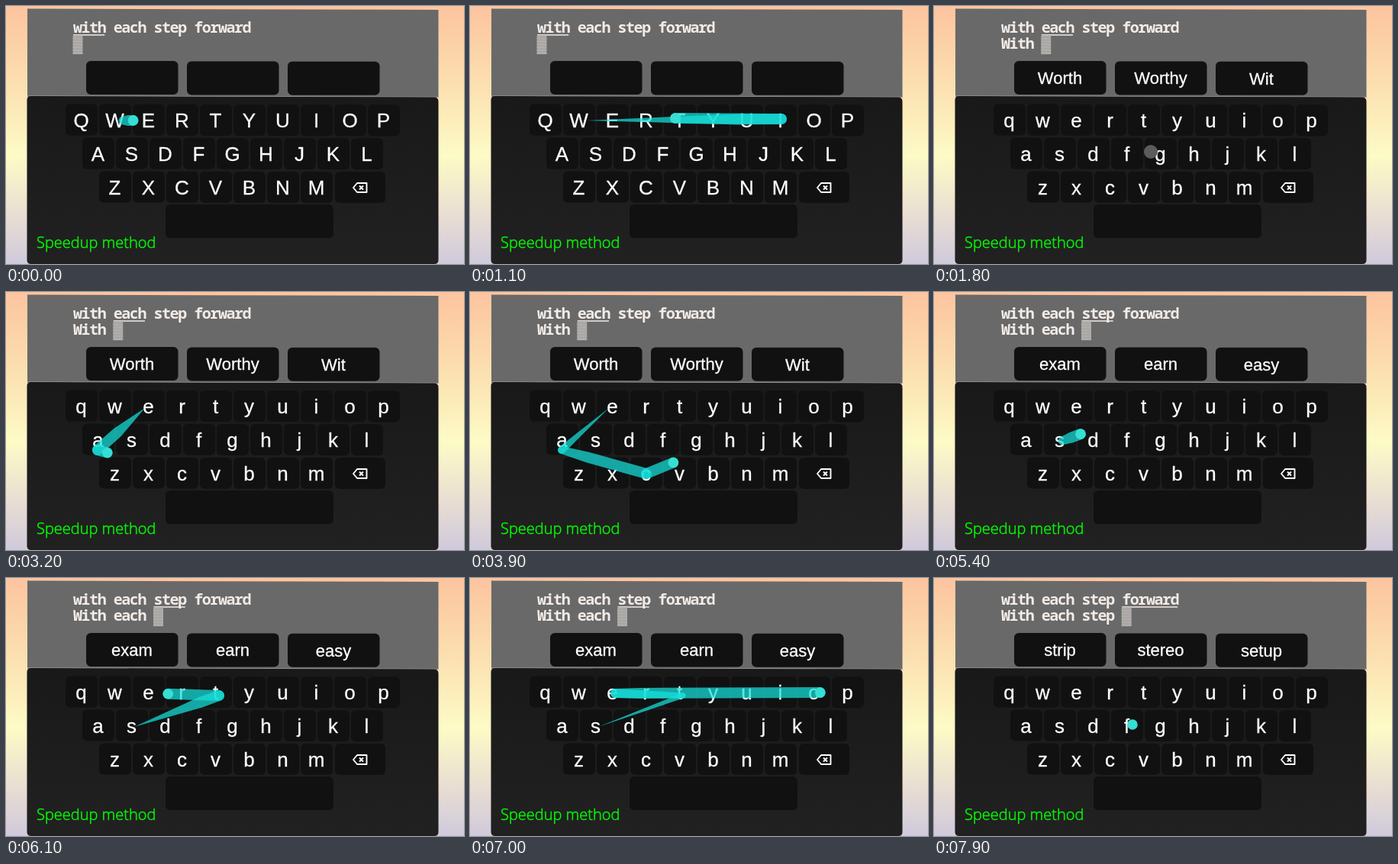
Write an HTML page that moves like this. It is 600 px wide and 338 px high and loops after 8000 ms.

```html
<!DOCTYPE html>
<html lang="en">
<head>
<meta charset="utf-8">
<title>Swipe keyboard</title>
<style>
html, body { margin: 0; width: 100%; height: 100%; overflow: hidden; }
svg { display: block; width: 100%; height: 100%; }
.keys, .words { font-family: "Liberation Sans", Arial, sans-serif; fill: #fff; text-anchor: middle; }
.keys { font-size: 26px; }
.words { font-size: 22px; }
.keys text, .words text { stroke: #fff; stroke-width: .3px; }
.mono { font: 600 20px "Noto Sans Mono", monospace; letter-spacing: -1.45px; fill: #f3ebe6; white-space: pre; }
.label { font: 300 20px "Open Sans", sans-serif; fill: #0f0; stroke: #0f0; stroke-width: .5px; }
</style>
</head>
<body>
<svg viewBox="0 0 600 338" preserveAspectRatio="none">
  <defs>
    <linearGradient id="sky" x2="0" y2="1">
      <stop offset="0" stop-color="#fcc49f"/>
      <stop offset=".3" stop-color="#fcdfb0"/>
      <stop offset=".58" stop-color="#fdfbc6"/>
      <stop offset=".8" stop-color="#eadfd2"/>
      <stop offset="1" stop-color="#cfcadc"/>
    </linearGradient>
    <linearGradient id="board" x2="0" y2="1">
      <stop offset="0" stop-color="#191919"/>
      <stop offset="1" stop-color="#212121"/>
    </linearGradient>
    <pattern id="weave" width="4" height="2" patternUnits="userSpaceOnUse">
      <path d="M0 .5h4" stroke="#d5d0cc"/>
      <path d="M0 1.5h4" stroke="#858381"/>
    </pattern>
  </defs>
  <rect width="600" height="338" fill="url(#sky)"/>
  <path d="M28 3.500L566.500 5V120L28 119Z" fill="#696969"/>
  <path d="M28 117.800L566.500 119.300" stroke="#aaa7a2" stroke-width=".8"/>
  <path d="M33 118L561 119.500Q566.500 119.500 566.500 125V333Q566.500 338 561 338H33Q27.500 338 27.500 333V123Q27.500 118 33 118Z" fill="url(#board)"/>
  <text class="mono" x="88" y="35">with each step forward</text>
  <text class="mono" id="typed" x="88" y="56"></text>
  <path id="underline" stroke="#f3ebe6" stroke-width="1.3"/>
  <rect id="caret" y="39" width="13" height="24" fill="url(#weave)"/>
  <g id="words" class="words"></g>
  <g id="keys" class="keys"></g>
  <path d="M455 238l5-6h12.500v12h-12.500zM463 235.500l5 5m0-5l-5 5" fill="none" stroke="#fff" stroke-width="1.9" stroke-linejoin="round"/>
  <text class="label" x="40" y="317">Speedup method</text>
  <g id="trail" fill="rgb(22,225,219)" fill-opacity=".72"></g>
  <circle id="dot"/>
</svg>
<script>
const LOOP = 8000, STEP = 100, CHAR = 10.55, LEFT = 88, WIDTH = 14;
const $ = id => document.getElementById(id);

function add(parent, tag, attrs, text = '') {
  const el = document.createElementNS('http://www.w3.org/2000/svg', tag);
  for (const name in attrs) el.setAttribute(name, attrs[name]);
  el.textContent = text;
  return parent.appendChild(el);
}

function addBox(parent, x, y, width, height) {
  add(parent, 'rect', { x, y, width, height, rx: 6, fill: '#111112' });
}

const letters = [];
['qwertyuiop', 'asdfghjkl', 'zxcvbnm'].forEach((row, r) => {
  [...row].forEach((char, i) => {
    const x = 98.5 + 22 * r + 44 * i, y = 128.5 + 44 * r + i * .1;
    addBox($('keys'), x - 20.5, y, 42, 41);
    letters.push({ char, el: add($('keys'), 'text', { x, y: y + 30 }) });
  });
});
addBox($('keys'), 431, 217, 66, 41);
addBox($('keys'), 209, 260, 220, 44);

const slots = [165, 297, 429].map((x, i) => {
  addBox($('words'), x - 60, 72 + i * .4, 120.5, 44);
  return add($('words'), 'text', { x, y: 102 + i * .4 });
});

// Each entry starts when the preceding swipe is released.
const stages = [
  { at: 0, typed: '', next: [0, 4], words: ['', '', ''] },
  { at: 1500, typed: 'With ', next: [5, 4], words: ['Worth', 'Worthy', 'Wit'] },
  { at: 4300, typed: 'With each ', next: [10, 4], words: ['exam', 'earn', 'easy'] },
  { at: 7200, typed: 'With each step ', next: [15, 7], words: ['strip', 'stereo', 'setup'] }
];

// Pointer paths as [time, x, y]; pressed paths leave a trail.
const paths = [
  { pressed: true, points: [[-130, 153, 150], [800, 408, 148], [1100, 269, 147], [1500, 338, 193]] },
  { pressed: false, points: [[1500, 338, 193], [1800, 284, 191], [2600, 182, 152]] },
  { pressed: true, points: [[2600, 182, 152], [3080, 120, 207], [3650, 231, 238], [4300, 338, 194]] },
  { pressed: false, points: [[4300, 338, 194], [4700, 276, 188], [5250, 168, 195]] },
  { pressed: true, points: [[5250, 168, 195], [5750, 279, 154], [6270, 190, 151], [7200, 495, 150]] },
  { pressed: false, points: [[7200, 495, 150], [7800, 260, 192]] },
  { pressed: true, points: [[7800, 260, 192], [8000, 260, 192]] }
];

const lerp = (a, b, k) => a + (b - a) * k;
const smooth = k => k * k * (3 - 2 * k);

function pointerAt(path, t) {
  const i = path.points.findIndex(p => p[0] > t);
  const [a, b] = [path.points[i - 1], path.points[i]];
  let k = (t - a[0]) / (b[0] - a[0]);
  if (path.pressed) k = smooth(k);
  return [t, lerp(a[1], b[1], k), lerp(a[2], b[2], k)];
}

// A tapered bar from one point to the next with a round far end.
function legShape([, ax, ay], [, bx, by], wa, wm, wb, m) {
  const len = Math.hypot(bx - ax, by - ay) || 1;
  const nx = (ay - by) / len / 2, ny = (bx - ax) / len / 2;
  const mx = lerp(ax, bx, m), my = lerp(ay, by, m);
  const at = (x, y, w) => `${x + nx * w} ${y + ny * w}`;
  return `M${at(ax, ay, wa)}L${at(mx, my, wm)}L${at(bx, by, wb)}` +
    `A${wb / 2} ${wb / 2} 0 0 0 ${at(bx, by, -wb)}` +
    `L${at(mx, my, -wm)}L${at(ax, ay, -wa)}A${wa / 2} ${wa / 2} 0 0 0 ${at(ax, ay, wa)}Z`;
}

const legs = [0, 1, 2].map(() => add($('trail'), 'path', {}));

function drawTrail(path, head) {
  const points = path.points.filter(p => p[0] < head[0]).concat([head]);
  const reach = [0];
  for (let i = 1; i < points.length; i++) {
    const [p, q] = [points[i - 1], points[i]];
    reach.push(reach[i - 1] + Math.hypot(q[1] - p[1], q[2] - p[2]));
  }
  const total = reach[reach.length - 1];
  const full = total / 2;
  const tail = WIDTH * Math.max(0, 1 - (head[0] - points[0][0]) / 600);
  const width = r => lerp(tail, WIDTH, Math.min(1, r / full));
  legs.forEach((leg, i) => {
    if (!path.pressed || total <= 1 || !points[i + 1]) return leg.setAttribute('d', '');
    const [from, to] = [reach[i], reach[i + 1]];
    const bend = Math.min(to, Math.max(from, full));
    leg.setAttribute('d', legShape(points[i], points[i + 1],
      width(from), width(bend), width(to), (bend - from) / (to - from || 1)));
  });
}

function render(t) {
  const stage = stages.filter(s => s.at <= t).pop();
  const [start, count] = stage.next;
  const x = LEFT + start * CHAR;
  $('typed').textContent = stage.typed;
  $('underline').setAttribute('d', `M${x} 38h${count * CHAR - 1}`);
  $('caret').setAttribute('x', LEFT - .5 + stage.typed.length * CHAR);
  slots.forEach((slot, i) => slot.textContent = stage.words[i]);
  letters.forEach(({ char, el }) => el.textContent = stage.typed ? char : char.toUpperCase());

  const path = paths.find(p => t < p.points[p.points.length - 1][0]);
  const head = pointerAt(path, t);
  drawTrail(path, head);
  const dot = $('dot');
  dot.setAttribute('cx', head[1]);
  dot.setAttribute('cy', head[2]);
  dot.setAttribute('r', path.pressed ? 6.8 : 9);
  dot.setAttribute('fill', path.pressed ? '#35dfd3' : '#5c5c5c');
}

const began = performance.now();
function tick() {
  const t = (performance.now() - began) % LOOP;
  render(Math.floor(t / STEP) * STEP);
  requestAnimationFrame(tick);
}
tick();
</script>
</body>
</html>
```
